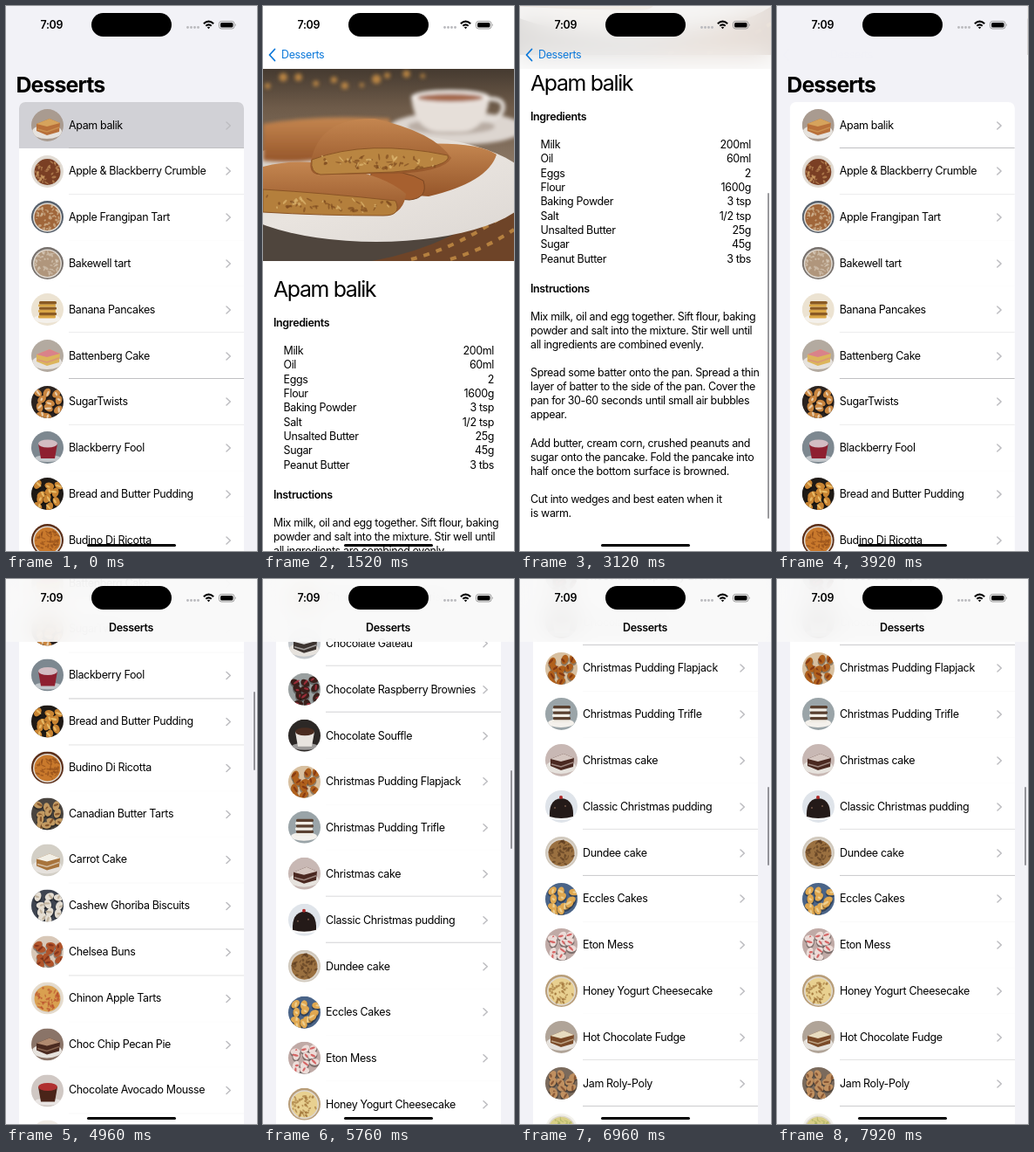
An HTML page that plays this animation: 288 by 624 pixels, repeating every 8000 ms.

```html
<!DOCTYPE html>
<html lang="en">
<head>
<meta charset="utf-8">
<title>Desserts</title>
<style>
  html, body { margin: 0; width: 100%; height: 100%; overflow: hidden; background: #fff; }
  #stage { position: relative; width: 288px; height: 624px; overflow: hidden;
    font: 400 12.46px/16px Inter, "Liberation Sans", sans-serif; letter-spacing: -.028em; color: #000; }
  #stage div, #stage svg { position: absolute; }
  .page { inset: 0; overflow: hidden; }
  #list { background: #f2f2f7; }
  #detail { background: #fff; }
  #dim { inset: 0; background: #000; }
  .scroll { left: 0; top: 0; width: 288px; }
  .line { white-space: pre; }
  .semi { font-weight: 600; }
  .big { font-size: 24.9px; line-height: 32px; letter-spacing: -.054em; }
  .bold { font-weight: 700; letter-spacing: -.036em; }
  .bar { left: 0; top: 0; width: 288px; height: 72px; background: rgba(249,249,249,.92);
    backdrop-filter: blur(14px) saturate(1.3); }
  #detailBar { background: rgba(249,249,249,.84); }
  #card { left: 15px; top: 110px; width: 258px; background: #fff; border-radius: 7px; overflow: hidden; }
  #pressed { left: 0; top: 0; width: 258px; height: 53px; background: #d1d1d6; }
  .rule { left: 57px; width: 201px; height: 1px; background: #c0c0c3; }
  .thumb { left: 14px; border-radius: 50%; }
  .knob { left: 284px; width: 2.3px; border-radius: 2px; background: rgba(60,60,67,.52); }
  #back { left: 0; top: 40px; color: #0b78da; }
  #island { left: 98px; top: 8px; width: 92px; height: 27px; border-radius: 14px; background: #000; }
  #home { left: 93px; top: 615.5px; width: 102px; height: 3.5px; border-radius: 2px; background: #000; }
</style>
</head>
<body>
<div id="stage">
  <div id="list" class="page">
    <div id="listScroll" class="scroll"><div id="card"><div id="pressed"></div></div></div>
    <div id="listBar" class="bar"></div>
    <div id="listKnob" class="knob" style="height:90px"></div>
  </div>
  <div id="dim"></div>
  <div id="detail" class="page">
    <div id="detailScroll" class="scroll">
      <svg id="photo" style="left:0;top:72px" width="288" height="220" viewBox="0 0 288 220">
        <defs>
          <linearGradient id="room" x2="0" y2="1"><stop stop-color="#453a30"/><stop offset=".2" stop-color="#6e5b49"/><stop offset=".5" stop-color="#8b7866"/></linearGradient>
          <linearGradient id="crust" x2="0" y2="1"><stop stop-color="#c48650"/><stop offset="1" stop-color="#96562a"/></linearGradient>
          <linearGradient id="plate" x2="1" y2="1"><stop stop-color="#cfc7be"/><stop offset=".5" stop-color="#e9e4df"/><stop offset="1" stop-color="#dcd7d3"/></linearGradient>
          <filter id="soft"><feGaussianBlur stdDeviation="2"/></filter>
          <filter id="fine"><feGaussianBlur stdDeviation=".7"/></filter>
        </defs>
        <rect width="288" height="220" fill="url(#room)"/>
        <g filter="url(#soft)">
          <g id="lights"></g>
          <ellipse cx="222" cy="68" rx="78" ry="19" fill="#ddd6d0"/>
          <ellipse cx="216" cy="66" rx="50" ry="9" fill="#b9ada4"/>
          <path d="M250 35q29-4 25 12-5 14-30 11" fill="none" stroke="#e4dfda" stroke-width="5"/>
          <path d="M170 32q4 40 34 40h22q30 0 34-40z" fill="#e6dfd9"/>
          <ellipse cx="215" cy="32" rx="45" ry="8" fill="#f2eeea"/>
          <ellipse cx="215" cy="33" rx="38" ry="5" fill="#a5694c"/>
        </g>
        <g filter="url(#fine)">
          <path d="M0 170Q140 214 288 128V220H0z" fill="#4f453d"/>
          <path d="M125 220Q225 202 288 140V220z" fill="#6e4428"/>
          <path d="M170 218q55-14 118-58M215 218q40-12 73-34" fill="none" stroke="#b5803f" stroke-width="4" stroke-dasharray="7 8"/>
          <ellipse cx="130" cy="136" rx="178" ry="62" fill="url(#plate)"/>
          <path d="M0 63Q60 52 145 57L150 82Q70 112 0 105z" fill="url(#crust)" filter="url(#soft)"/>
          <path d="M150 88Q240 80 268 98Q258 130 190 146L130 142z" fill="url(#crust)"/>
          <path d="M125 116Q165 116 184 128Q190 148 168 150L118 146z" fill="#a7602f" stroke="#7b4722"/>
          <path d="M0 112Q42 101 84 112Q140 122 164 143Q162 164 142 168L0 164z" fill="url(#crust)"/>
          <path d="M0 138Q70 142 152 151Q160 168 138 168Q66 168 0 164z" fill="#b47f3c" stroke="#8a5426"/>
          <path d="M55 105Q66 55 128 57Q196 72 216 102Q208 118 150 120L62 121Q52 118 55 105z" fill="url(#crust)"/>
          <path d="M56 104Q120 80 212 99Q218 112 150 118L66 121Q54 119 56 104z" fill="#b98541" stroke="#8a5426"/>
          <g id="crumbs"></g>
        </g>
      </svg>
    </div>
    <div id="detailBar" class="bar"></div>
    <div id="detailKnob" class="knob" style="height:373px"></div>
  </div>
  <div id="back">
    <svg width="20" height="32"><path d="M13.5 9.5 7.500 16l6 6.500" fill="none" stroke="#0b78da" stroke-width="1.8" stroke-linecap="round" stroke-linejoin="round"/></svg>
  </div>
  <div id="status">
    <div id="island"></div>
    <svg width="288" height="40">
      <g fill="#b9b9bd"><circle cx="208.5" cy="24.5" r="1.4"/><circle cx="212.5" cy="24.5" r="1.4"/><circle cx="216.5" cy="24.5" r="1.4"/><circle cx="220.5" cy="24.5" r="1.4"/></g>
      <g fill="none" stroke="#000" stroke-width="2"><path d="M226.800 20.200q5.700-5.200 11.400 0M229.300 22.800q3.200-2.900 6.400 0"/></g>
      <path d="M230.800 24.500q1.700-1.400 3.400 0l-1.700 1.800z"/>
      <rect x="244.5" y="17.5" width="17.5" height="8.5" rx="2.7" fill="none" stroke="#999"/>
      <rect x="246" y="19" width="14.5" height="5.5" rx="1.5"/>
      <path d="M263 20.300q1.700 1.400 0 2.900z" fill="#999"/>
    </svg>
  </div>
  <div id="home"></div>
</div>
<script>
const $ = id => document.getElementById(id);
const PITCH = 52.8, LOOP = 8000, STEP = 80;
const clamp = v => Math.max(0, Math.min(1, v));

// name | backdrop, food, accent | shape
const DESSERTS = `Apam balik|#a99b90 #b8703a #d6a35c|slab
Apple & Blackberry Crumble|#e2dcd4 #7a3f24 #c99a62|round
Apple Frangipan Tart|#56606c #a0663a #d9c3a4|round
Bakewell tart|#77716d #b0967c #d8cbbb|round
Banana Pancakes|#ece3d2 #d9a545 #8a5a24|stack
Battenberg Cake|#b3aaa0 #dcb55c #d9828a|slab
SugarTwists|#2b2320 #c9853f #f0dfc6|bits
Blackberry Fool|#7d8890 #8e2030 #d3bcc2|cup
Bread and Butter Pudding|#1f1a16 #c98432 #f0c873|bits
Budino Di Ricotta|#5b2e18 #c9792c #8a4818|round
Canadian Butter Tarts|#4a4540 #c29a62 #75451f|bits
Carrot Cake|#d3cfc6 #a8743c #f2efe6|slab
Cashew Ghoriba Biscuits|#3e4450 #e4ddd2 #b8a890|bits
Chelsea Buns|#d8c8b8 #b0542a #7a2c18|bits
Chinon Apple Tarts|#e6dccd #d9a050 #b84a2a|round
Choc Chip Pecan Pie|#8a7468 #4a2a20 #b08a70|slab
Chocolate Avocado Mousse|#d0c8c4 #4a2419 #b03030|cup
Chocolate Caramel Crispy|#f1ece5 #6a3a22 #d8a860|slab
Chocolate Gateau|#c4c8cc #3c3430 #e8e8e8|slab
Chocolate Raspberry Brownies|#9aa0a0 #3a1f1a #b03040|bits
Chocolate Souffle|#2c2826 #e8e4df #4a2c20|cup
Christmas Pudding Flapjack|#d8c0a0 #b0601c #7a3010|bits
Christmas Pudding Trifle|#9aa4a8 #f0ece4 #5a4030|stack
Christmas cake|#c8b8b4 #4a2820 #d5c6c0|slab
Classic Christmas pudding|#dfe4ea #241a18 #b02828|dome
Dundee cake|#d0c8bc #9a7040 #5a3a20|round
Eccles Cakes|#4a6488 #e0a850 #f0d8a0|bits
Eton Mess|#c0aaa6 #ecdcd8 #d04848|bits
Honey Yogurt Cheesecake|#b89d78 #e8d090 #9a6a30|round
Hot Chocolate Fudge|#b0a498 #7a4a28 #e8dcc0|slab
Jam Roly-Poly|#7a6a5c #c09060 #7a4a2c|bits
Key Lime Pie|#f3f2ec #d9cf86 #a9b060|round`.split("\n").map(r => r.split("|"));

const INGREDIENTS = [["Milk", "200ml"], ["Oil", "60ml"], ["Eggs", "2"], ["Flour", "1600g"],
  ["Baking Powder", "3 tsp"], ["Salt", "1/2 tsp"], ["Unsalted Butter", "25g"], ["Sugar", "45g"], ["Peanut Butter", "3 tbs"]];

const STEPS = `Mix milk, oil and egg together. Sift flour, baking
powder and salt into the mixture. Stir well until
all ingredients are combined evenly.

Spread some batter onto the pan. Spread a thin
layer of batter to the side of the pan. Cover the
pan for 30-60 seconds until small air bubbles
appear.

Add butter, cream corn, crushed peanuts and
sugar onto the pancake. Fold the pancake into
half once the bottom surface is browned.

Cut into wedges and best eaten when it
is warm.`.split("\n");

function seeded(seed) {
  return () => (seed = (seed * 16807 + 11) % 2147483647) / 2147483647;
}

function add(parent, cls, css = {}) {
  const el = document.createElement("div");
  el.className = cls;
  Object.assign(el.style, css);
  parent.append(el);
  return el;
}

// One line of text, centred vertically on y.
function line(parent, text, x, y, cls = "", right = false) {
  const half = cls.includes("big") ? 16 : 8;
  const el = add(parent, "line " + cls, { top: y - half + "px", [right ? "right" : "left"]: x + "px" });
  el.textContent = text;
  return el;
}

const dot = (x, y, r, fill, o = 1) =>
  `<circle cx="${x.toFixed(1)}" cy="${y.toFixed(1)}" r="${r.toFixed(1)}" fill="${fill}" opacity="${o}"/>`;

const chunk = (x, y, rx, ry, turn, fill, o = 1) =>
  `<ellipse rx="${rx}" ry="${ry}" fill="${fill}" opacity="${o}" transform="translate(${x} ${y}) rotate(${turn})"/>`;

const SHAPES = {
  round(food, accent, rnd) {
    let s = dot(18.5, 19, 16.5, "#ded8d0") + dot(18.5, 19, 15, food);
    for (let i = 0; i < 40; i++) {
      const a = rnd() * 6.28, d = 14 * Math.sqrt(rnd());
      s += chunk(18.5 + d * Math.cos(a), 19 + d * Math.sin(a), 1 + rnd() * 2, .5 + rnd(), rnd() * 180, accent, .6);
    }
    return s;
  },
  slab: (food, accent) => `<ellipse cx="18" cy="26" rx="17" ry="8" fill="#e6e2dd"/>
    <path d="M6 17 21 11 33 16 32 26 18 30 6 25z" fill="${food}"/>
    <path d="M6 17 21 11 33 16 18 20z" fill="${accent}"/><path d="M7 23 18 26 32 21" stroke="${accent}" stroke-width="1.5" fill="none" opacity=".6"/>`,
  bits(food, accent, rnd) {
    let s = "";
    for (let i = 0; i < 11; i++) {
      const x = 7 + (i % 3) * 10 + rnd() * 6, y = 7 + Math.floor(i / 3) * 8 + rnd() * 5, turn = rnd() * 180;
      s += chunk(x, y + 1.5, 6, 4.5, turn, "#000", .35) + chunk(x, y, 5.5, 3.8, turn, food)
        + chunk(x + rnd() * 4 - 2, y + rnd() * 2 - 1, 2 + rnd() * 2, 1.2, rnd() * 180, accent, .8);
    }
    return s;
  },
  stack(food, accent) {
    let s = `<ellipse cx="18" cy="29" rx="15" ry="5" fill="#f4f1ec"/>`;
    for (let i = 0; i < 6; i++)
      s += `<rect x="${8 + i % 2}" y="${25 - i * 3.2}" width="20" height="3.4" rx="1.5" fill="${i % 2 ? accent : food}"/>`;
    return s;
  },
  cup: (food, accent) => `<ellipse cx="19" cy="31" rx="15" ry="4" fill="#fff8"/>
    <path d="M8 14H30L27 31H11z" fill="${food}"/><ellipse cx="19" cy="14" rx="11" ry="4.5" fill="${accent}"/>`,
  dome: (food, accent) => `<ellipse cx="18" cy="30" rx="16" ry="4" fill="#f8f8f8"/>
    <path d="M5 30Q4 10 18.500 9 33 10 32 30 18 34 5 30z" fill="${food}"/>` + dot(18, 8, 2, accent) + dot(11, 20, 1, "#77584a") + dot(23, 18, 1, "#77584a")
};

function thumb([, colours, shape], i) {
  const [bg, food, accent] = colours.split(" ");
  return `<svg class="thumb" style="top:${7.7 + i * PITCH}px" width="37" height="37">
    <rect width="37" height="37" fill="${bg}"/><g filter="url(#fine)">${SHAPES[shape](food, accent, seeded(i * 977 + 31))}</g></svg>`;
}

// Dessert list
const card = $("card");
card.style.height = PITCH * 40 + "px";
const rules = DESSERTS.map((row, i) => {
  const y = 26.6 + i * PITCH;
  card.insertAdjacentHTML("beforeend", thumb(row, i) +
    `<svg style="left:236px;top:${y - 6}px" width="10" height="12"><path d="M2 2l4.300 4L2 10" fill="none" stroke="#bdbdc1" stroke-width="1.5" stroke-linecap="round" stroke-linejoin="round"/></svg>`);
  line(card, row[0], 57, y);
  return add(card, "rule");
});
const bigTitle = line($("listScroll"), "Desserts", 11.5, 90, "big bold");
const barTitle = line($("list"), "Desserts", 118, 56, "semi");

// Recipe page
const recipe = $("detailScroll");
line(recipe, "Apam balik", 12, 324, "big");
line(recipe, "Ingredients", 12, 363, "semi");
INGREDIENTS.forEach(([name, amount], i) => {
  const y = 394.8 + i * 16.36;
  line(recipe, name, 23.5, y);
  line(recipe, amount, 23, y, "", true);
});
line(recipe, "Instructions", 12, 560, "semi");
STEPS.forEach((text, i) => line(recipe, text, 12, 591.5 + i * 16.13));

const rnd = seeded(4211);
for (let i = 0; i < 11; i++)
  $("lights").innerHTML += dot(5 + i * 17 + rnd() * 9, 5 + rnd() * 16, 2 + rnd() * 4, "#dc9b45", .75);
for (let i = 0; i < 110; i++) {
  const upper = i % 2, u = rnd();
  $("crumbs").innerHTML += chunk(upper ? 64 + u * 136 : u * 145, (upper ? 100 : 145 + u * 7) + rnd() * 14,
    1 + rnd() * 3, .7 + rnd(), rnd() * 180, i % 3 ? "#7d4a1e" : "#e0bb74", .65);
}

line($("status"), "7:09", 39.5, 21.5, "semi");
const backLabel = line($("back"), "Desserts", 21, 16);

function spring(x, k) {
  if (x <= 0) return 0;
  const v = 1 - (1 + k * x) * Math.exp(-k * x);
  return v > .998 ? 1 : v;
}

// Short drag, then a free fling that slows down and stops.
function listOffset(t) {
  if (t < 4680) return 0;
  if (t < 4800) return 103 * ((t - 4680) / 120) ** 2;
  return Math.min(1143.05, 1169.55 - 774 * Math.exp((4960 - t) / 500));
}

const move = (el, x, y) => el.style.transform = `translate(${x}px,${y}px)`;

function draw(t) {
  const open = spring(t - 1000, .018) - spring(t - 3400, .016);
  const s = listOffset(t), d = 236 * spring(t - 2100, .0085);

  move($("list"), -86 * open, 0);
  move($("listScroll"), 0, -s);
  $("pressed").style.opacity = t < 3400 ? 1 : open;
  bigTitle.style.opacity = 1 - open;
  $("listBar").style.opacity = clamp((s - 8) / 25);
  barTitle.style.opacity = clamp((s - 25) / 25);
  $("listKnob").style.opacity = clamp(s / 20);
  $("listKnob").style.top = 71.5 + s * .1456 + "px";

  // Hairlines are thinner than a pixel, so they show by how they meet the pixel grid.
  rules.forEach((rule, i) => {
    const off = PITCH * i - s;
    const miss = Math.abs(off - Math.round(off));
    rule.style.top = Math.floor(162.5 + off) + s - 110 + "px";
    rule.style.opacity = Math.max(.04, 1 - miss / .28);
  });

  $("dim").style.opacity = .1 * open;
  $("detail").style.visibility = open > 0 ? "visible" : "hidden";
  move($("detail"), 288 * (1 - open), 0);
  move(recipe, 0, -d);
  $("detailBar").style.opacity = clamp(d / 30);
  $("detailKnob").style.opacity = clamp(d / 15);
  $("detailKnob").style.top = 75 + d * .589 + "px";
  $("back").style.opacity = open * (t >= 3280 && t < 3440 ? .4 : 1);
  move(backLabel, 40 * (1 - open), 0);
}

const start = performance.now();
function tick() {
  const t = (performance.now() - start) % LOOP;
  draw(Math.floor(t / STEP) * STEP);
  requestAnimationFrame(tick);
}
tick();
</script>
</body>
</html>
```
